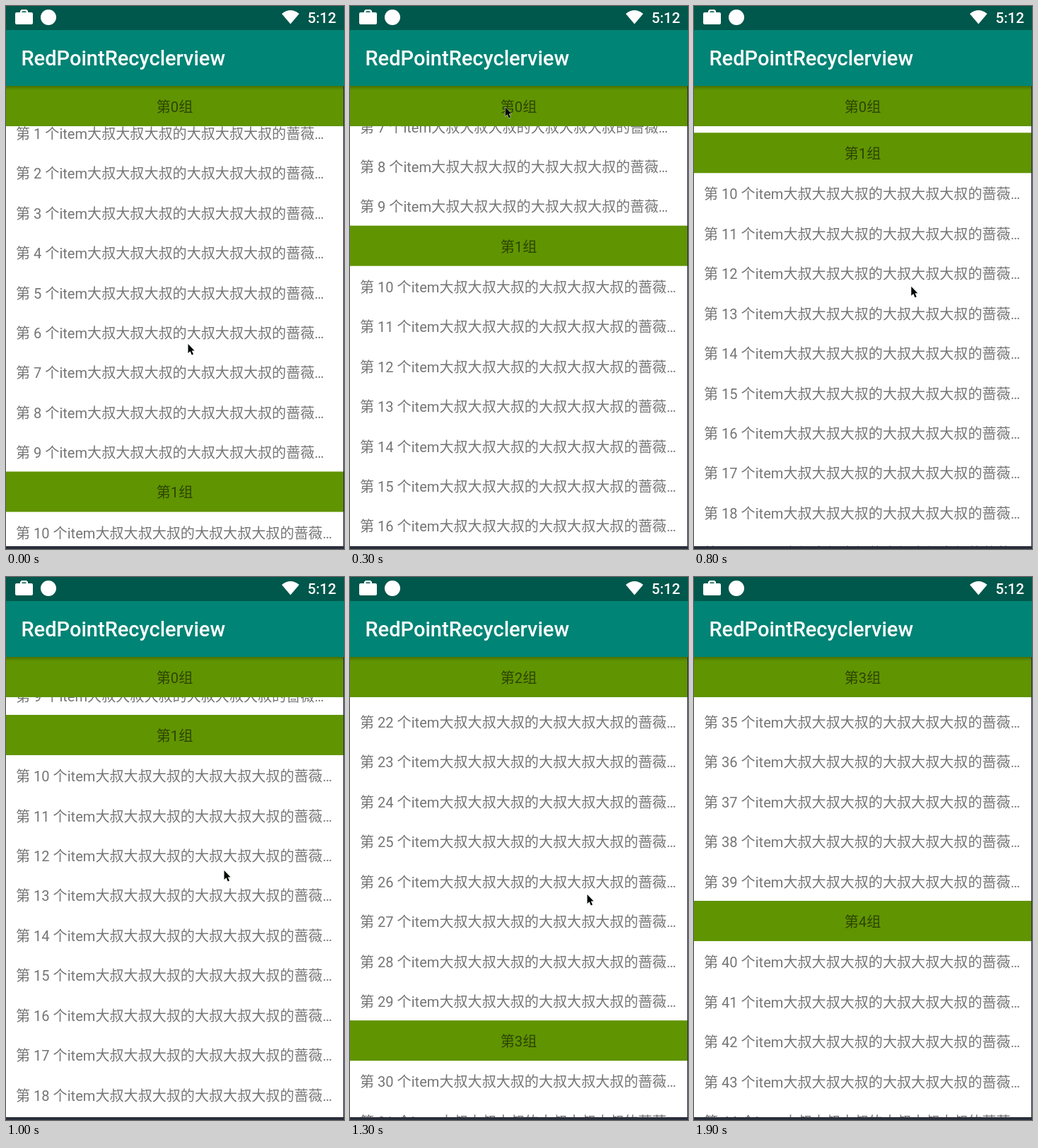
Write an HTML page that moves like this. It is 478x768 px and loops after 2000 ms.

```html
<!DOCTYPE html>
<html lang="zh-CN">
<head>
<meta charset="utf-8">
<title>RedPointRecyclerview</title>
<style>
  html, body { margin: 0; width: 100%; height: 100%; overflow: hidden; background: #fff; }
  svg { display: block; width: 478px; height: 768px; }
  text { font: 20.08px Roboto, "Noto Sans CJK SC", "Noto Sans CJK JP", sans-serif; }
  .item { fill: #757575; }
  .band { fill: #609400; }
  .group { fill: rgba(0, 0, 0, .54); text-anchor: middle; }
  .title { font-size: 29px; font-weight: 500; fill: #fff; }
  .clock { font-size: 20.6px; font-weight: 500; fill: #fff; text-anchor: end; }
</style>
</head>
<body>
<svg viewBox="0 0 478 768">
  <defs>
    <linearGradient id="shade" x1="0" y1="0" x2="0" y2="1">
      <stop offset="0" stop-opacity=".25"/>
      <stop offset="1" stop-opacity="0"/>
    </linearGradient>
  </defs>
  <rect width="478" height="768" fill="#fff"/>
  <g id="list"></g>
  <g id="pinned"></g>

  <rect y="113" width="478" height="6" fill="url(#shade)"/>
  <rect x="477" y="113" width="1" height="655" fill="#2b2e3b"/>
  <rect y="764" width="478" height="4" fill="#2b2e3b"/>
  <rect y="34" width="478" height="79" fill="#008475"/>
  <rect width="478" height="34" fill="#00574b"/>
  <text class="title" x="21.5" y="84">RedPointRecyclerview</text>
  <text class="clock" x="467" y="24">5:12</text>
  <g fill="#fff">
    <rect x="13" y="9" width="25" height="17" rx="2"/>
    <path d="M20 10V7l2-2h7l2 2v3h-2.5V7.500h-6V10z"/>
    <circle cx="60" cy="16" r="11"/>
    <path d="M390 11Q402.300 1 414.600 11L402.300 25.500z"/>
  </g>
  <path id="cursor" d="M0 0V13L3 10.300L5.200 15.500L7.500 14.500L5.200 9.500H9z"
    fill="#000800" stroke="#fff" paint-order="stroke"/>
</svg>
<script>
const ROW = 56.43, HEAD = 57, GROUP = 10 * ROW + HEAD;
const LIST_TOP = 37.2, PIN_TOP = 113, STEP = 100, LOOP = 2000;

const linear = u => u;
const slowDown = u => 1 - (1 - u) ** 1.75;
const speedUp = u => u ** 1.329;

// Each key gives its time, its value and the easing that leads to it.
const scrollKeys = [
  { time: 0, at: [0] },
  { time: 600, at: [495], ease: slowDown },
  { time: 1000, at: [463.5], ease: linear },
  { time: 1500, at: [2061.4], ease: speedUp },
  { time: 1800, at: [2064.4], ease: slowDown },
];
const cursorKeys = [
  { time: 0, at: [257.5, 478] },
  { time: 300, at: [219.5, 143] },
  { time: 600, at: [306, 378.5] },
  { time: 1000, at: [308.5, 415] },
  { time: 1300, at: [335.5, 449] },
  { time: 1500, at: [341.5, 489] },
  { time: 1800, at: [465, 587] },
];

function valueAt(keys, time) {
  const next = keys.findIndex(key => key.time > time);
  if (next < 0) return keys.at(-1).at;
  const a = keys[next - 1], b = keys[next];
  const u = (b.ease ?? linear)((time - a.time) / (b.time - a.time));
  return a.at.map((v, i) => v + (b.at[i] - v) * u);
}

const list = document.getElementById('list');
const pinned = document.getElementById('pinned');
const cursor = document.getElementById('cursor');
const moveTo = (el, x, y) => el.setAttribute('transform', `translate(${x} ${y})`);

const header = (group, top) =>
  `<rect class="band" y="${top}" width="477" height="${HEAD}"/>
   <text class="group" x="238.5" y="${top + 37}">第${group}组</text>`;

const item = (index, top) =>
  `<text class="item" x="14" y="${top + ROW / 2 + 9}">第 ${index} 个item${'大叔大叔大叔的'.repeat(2)}蔷薇…</text>`;

let markup = '';
for (let group = 0; group < 5; group++) {
  const top = group * GROUP;
  markup += header(group, top);
  for (let row = 0; row < 10; row++)
    markup += item(group * 10 + row, top + HEAD + row * ROW);
}
list.innerHTML = markup;

let shownGroup = -1;

function render(elapsed) {
  const time = Math.floor(elapsed / STEP) * STEP % LOOP;
  const [scroll] = valueAt(scrollKeys, time);
  const top = LIST_TOP - scroll;
  const group = Math.floor((PIN_TOP - top) / GROUP);
  if (group !== shownGroup) {
    pinned.innerHTML = header(group, 0);
    shownGroup = group;
  }
  // The next header pushes the pinned one up.
  const nextTop = top + (group + 1) * GROUP;
  moveTo(list, 0, top);
  moveTo(pinned, 0, Math.min(PIN_TOP, nextTop - HEAD));
  moveTo(cursor, ...valueAt(cursorKeys, time));
  cursor.style.display = time > cursorKeys.at(-1).time ? 'none' : '';
}

const start = performance.now();
function tick() {
  render(performance.now() - start);
  requestAnimationFrame(tick);
}
tick();
</script>
</body>
</html>
```
